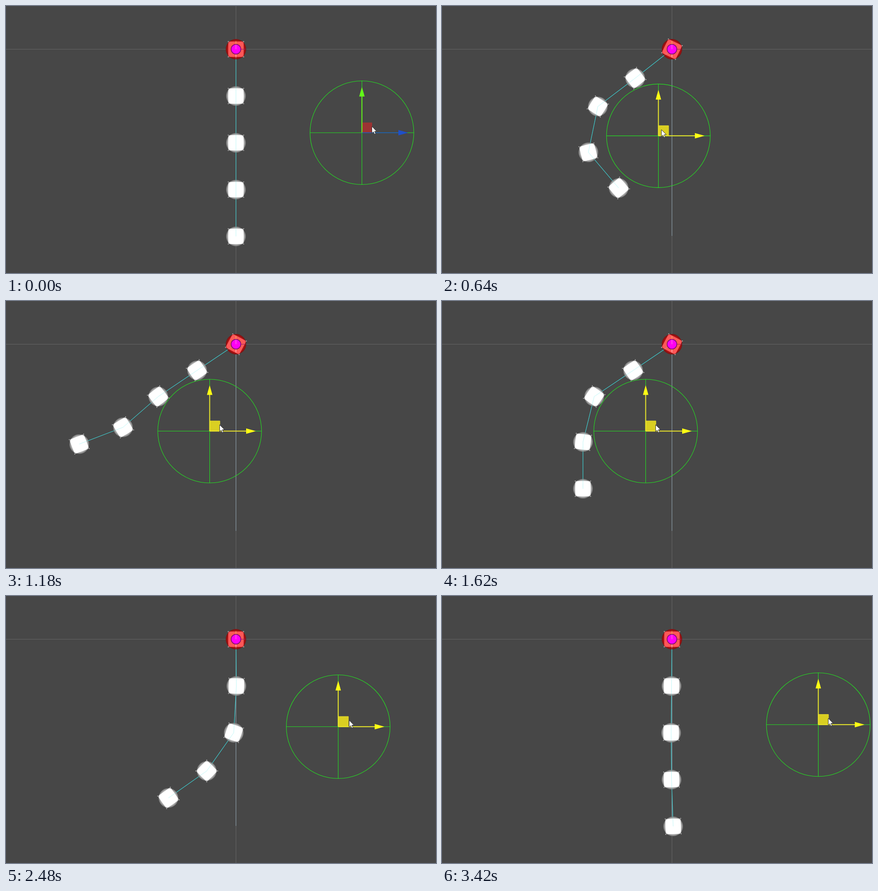
Recreate the animation shown at these times as an HTML page with a canvas. Size 949x590 px, loop 3.44 s.

```html
<!DOCTYPE html>
<html>
<head>
<meta charset="utf-8">
<style>
  html, body { margin: 0; width: 100%; height: 100%; overflow: hidden; background: #474747; }
  canvas { display: block; }
</style>
</head>
<body>
<canvas width="949" height="590"></canvas>
<script>
const ctx = document.querySelector('canvas').getContext('2d');
const LOOP = 3440, LINK = 103.4, AX = 507.5, AY = 95.5, TAU = Math.PI * 2;

// Rope poses: each link's angle in degrees from straight down, right is positive
const POSES = [
  { at: 310, links: [0, 0, 0, 0] },
  { at: 640, links: [-51.7, -52.8, -11.6, 40.3] },
  { at: 1040, links: [-57, -59, -69, -78] },
  { at: 1180, links: [-56, -56, -49, -69.1] },
  { at: 1520, links: [-56, -56, -14, 0] },
  { at: 2140, links: [-53, -58.5, -13.6, -1.7] },
  { at: 2480, links: [0.5, -3.3, -35.2, -54.8] },
  { at: 2920, links: [6.1, 15.1, 27.6, 44.6] },
  { at: 3420, links: [-0.5, -0.5, 0.5, 2] }
];

// The collider is dragged three times
const DRAGS = [
  { from: 100, to: 758, dx: -336, dy: 7.5 },
  { from: 2070, to: 2365, dx: 283.7, dy: 1.2 },
  { from: 2500, to: 2740, dx: 97.3, dy: -4.5 }
];

const clamp01 = u => Math.max(0, Math.min(1, u));
const smooth = u => u * u * (3 - 2 * u);

function collider(t) {
  let x = 785.5, y = 280;
  for (const { from, to, dx, dy } of DRAGS) {
    const k = smooth(clamp01((t - from) / (to - from)));
    x += dx * k;
    y += dy * k;
  }
  return [x, y];
}

// Monotone cubic through the poses: starts at rest, is still moving at the end
function linkAngle(n, t) {
  const last = POSES.length - 1;
  const slope = j => (POSES[j + 1].links[n] - POSES[j].links[n]) / (POSES[j + 1].at - POSES[j].at);
  const tangent = j => {
    if (j === 0) return 0;
    if (j === last) return slope(j - 1);
    const p = slope(j - 1), q = slope(j);
    return p * q > 0 ? 2 * p * q / (p + q) : 0;
  };
  let i = 0;
  while (i < last - 1 && POSES[i + 1].at <= t) i++;
  const a = POSES[i], b = POSES[i + 1], h = b.at - a.at;
  const u = clamp01((t - a.at) / h), v = 1 - u;
  const degrees = a.links[n] + (b.links[n] - a.links[n]) * smooth(u)
    + h * u * v * (tangent(i) * (v - 0) - tangent(i + 1) * u);
  return degrees * Math.PI / 180;
}

function trace(points) {
  ctx.beginPath();
  points.forEach(p => ctx.lineTo(...p));
}

function line(points, color, width = 1) {
  trace(points);
  ctx.strokeStyle = color;
  ctx.lineWidth = width;
  ctx.stroke();
}

function polygon(points, fill) {
  trace(points);
  ctx.closePath();
  ctx.fillStyle = fill;
  ctx.fill();
}

function disc(x, y, r, fill) {
  ctx.beginPath();
  ctx.arc(x, y, r, 0, TAU);
  ctx.fillStyle = fill;
  ctx.fill();
}

function radial(r, inner, start, outer) {
  const g = ctx.createRadialGradient(0, 0, r * start, 0, 0, r);
  g.addColorStop(0, inner);
  g.addColorStop(1, outer);
  return g;
}

// Ball with a brighter square inside and four corner handles
function ball([x, y], angle, root) {
  const r = root ? 22.5 : 21.8, half = 17;
  ctx.save();
  ctx.translate(x, y);
  ctx.rotate(angle);
  disc(0, 0, r, root ? radial(r, '#b01414', 0.8, '#781010') : radial(r, '#c4c4c4', 0.78, '#707070'));
  ctx.save();
  ctx.beginPath();
  ctx.rect(-half, -half, half * 2, half * 2);
  ctx.clip();
  disc(0, 0, r + 0.5, root ? radial(r, '#ff5858', 0.9, '#d83a3a') : radial(r, '#fff', 0.88, '#d0d0d0'));
  ctx.restore();
  ctx.fillStyle = '#e4e4e4';
  for (const sx of [-1, 1]) for (const sy of [-1, 1])
    ctx.fillRect(sx * half - 0.8, sy * half - 0.8, 1.6, 1.6);
  ctx.restore();
}

function gizmo([x, y], active) {
  const up = active ? '#ffff14' : '#62fa18', right = active ? '#ffff14' : '#1f4fc8';
  const green = '#25df22', r = 114.5;
  ctx.save();
  ctx.translate(x, y);
  ctx.beginPath();
  ctx.arc(0, 0, r, 0, TAU);
  ctx.strokeStyle = green;
  ctx.lineWidth = 1.1;
  ctx.stroke();
  line([[-r, 0], [r, 0]], green, 1.1);
  line([[0, -r], [0, r]], green, 1.1);
  ctx.fillStyle = active ? '#dacf22' : 'rgba(180,45,45,.78)';
  ctx.fillRect(0, -22.5, 22.5, 22.5);
  if (active) line([[0, -22.5], [22.5, -22.5], [22.5, 0]], '#eae02a');
  line([[0, 0], [0, -82]], active ? '#eee82a' : up, 2);
  line([[0, 0], [82, 0]], active ? '#eee82a' : right, active ? 2 : 1.4);
  polygon([[0, -101.5], [-6, -80], [6, -80]], up);
  polygon([[102, 0], [80.5, -6], [80.5, 6]], right);
  ctx.restore();
}

function pointer(x, y) {
  ctx.save();
  ctx.translate(x, y);
  polygon([[0, 0], [0, 15], [3.4, 11.9], [5.8, 17.3], [8.4, 16.2], [6, 11], [10.7, 11]], '#fff');
  ctx.strokeStyle = '#303030';
  ctx.lineWidth = 1;
  ctx.stroke();
  ctx.restore();
}

function draw(t) {
  const angles = [0, 1, 2, 3].map(n => linkAngle(n, t));
  const nodes = [[AX, AY]];
  angles.forEach((a, i) => {
    const [x, y] = nodes[i];
    nodes.push([x + LINK * Math.sin(a), y + LINK * Math.cos(a)]);
  });

  ctx.fillStyle = '#474747';
  ctx.fillRect(0, 0, 949, 590);
  line([[0, AY], [949, AY]], '#666');
  line([[AX, 0], [AX, 590]], '#666');
  line([[AX, AY], [AX, 508]], '#8c9ca7', 1.2);
  line(nodes, '#34c0c3', 1.1);

  // Each ball turns by the mean of the links that meet there
  nodes.forEach((p, i) => {
    const before = i ? angles[i - 1] : 0, after = angles[i] ?? before;
    ball(p, -(before + after) / 2, i === 0);
  });
  line(nodes, 'rgba(90,235,235,.38)');

  line([[AX, AY - 18], [AX, AY - 11]], '#e0c050');
  line([[AX, AY + 11], [AX, AY + 18]], '#f3d0d0');
  line([[AX + 11, AY], [AX + 21, AY]], '#90256c');
  disc(AX, AY, 11.5, '#78106c');
  disc(AX, AY, 10, '#ff00f4');
  line([[AX, AY - 10], [AX, AY]], '#ff8ce8');

  gizmo(collider(t), t >= 80);
  const [x, y] = collider(t + 40); // the collider lags behind the pointer
  pointer(x + 22, y - 14);
}

function frame() {
  draw(performance.now() % LOOP);
  requestAnimationFrame(frame);
}
frame();
</script>
</body>
</html>
```
